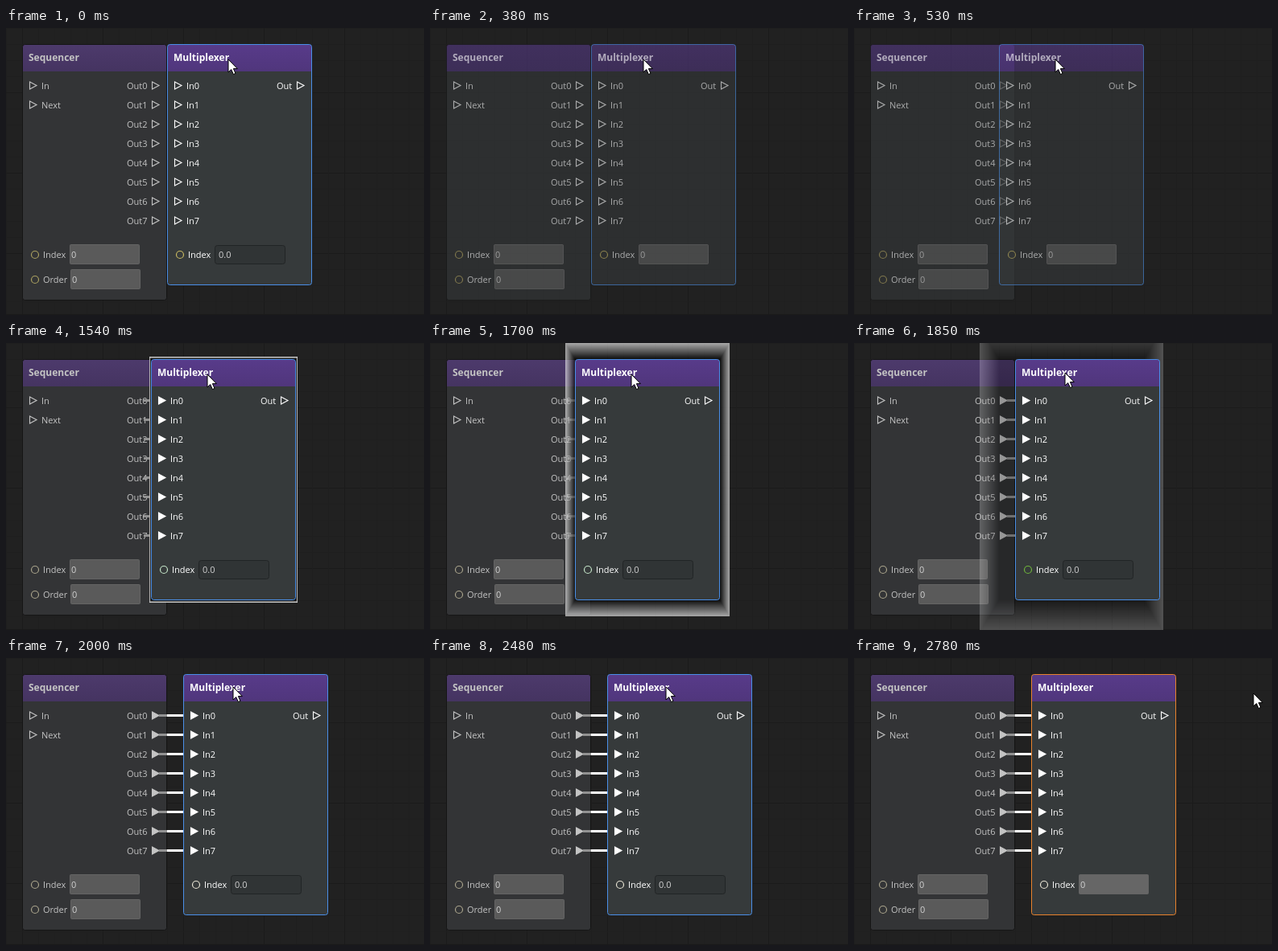
These frames come from a looping animation (519 px wide and 357 px high, 3180 ms). An HTML page with a canvas:

```html
<!DOCTYPE html>
<html lang="en">
<head>
<meta charset="utf-8">
<style>
html, body { margin: 0; width: 100%; height: 100%; overflow: hidden; background: #212121; }
canvas { display: block; }
</style>
</head>
<body>
<canvas id="stage" width="519" height="357"></canvas>
<script>
const LOOP = 3180;
const ctx = document.getElementById('stage').getContext('2d');
const glow = document.createElement('canvas').getContext('2d');
glow.canvas.width = 260;
glow.canvas.height = 420;

// The picture is held between these moments.
const ticks = [0, 70, 150, 380, 450, 530, 1540, 1620, 1700, 1770, 1850, 1930, 2000,
  2080, 2160, 2480, 2550, 2630, 2700, 2780];

const cursorPath = [[0, 276, 39], [150, 270, 39], [300, 270, 39], [380, 265, 39], [450, 256, 39],
  [530, 250, 39], [1700, 250, 39], [1770, 254, 38], [1850, 262, 37], [1930, 273, 36],
  [2000, 282, 36], [2160, 293, 36], [2480, 293, 36], [2550, 316, 37], [2630, 384, 40],
  [2700, 455, 43], [2780, 496, 44]];
const glowScale = [[1540, 1.02], [1700, 1.133], [1850, 1.267], [1940, 1.34]];

function sample(keys, t) {
  const next = keys.findIndex(k => k[0] > t);
  if (next < 0) return keys[keys.length - 1].slice(1);
  if (next === 0) return keys[0].slice(1);
  const a = keys[next - 1], b = keys[next], p = (t - a[0]) / (b[0] - a[0]);
  return a.slice(1).map((v, i) => v + (b[i + 1] - v) * p);
}

function text(str, x, y, color, font = '11px') {
  ctx.font = `${font} "Open Sans", "Noto Sans", sans-serif`;
  ctx.fillStyle = color;
  ctx.fillText(str, x, y);
}

function box(x, y, w, h, r, fill, stroke) {
  ctx.beginPath();
  ctx.roundRect(x + .5, y + .5, w - 1, h - 1, r);
  if (fill) { ctx.fillStyle = fill; ctx.fill(); }
  if (stroke) { ctx.strokeStyle = stroke; ctx.lineWidth = 1; ctx.stroke(); }
}

function triangle(x, y, color, filled) {
  ctx.beginPath();
  ctx.moveTo(x + .5, y - 4.5);
  ctx.lineTo(x + 9, y);
  ctx.lineTo(x + .5, y + 4.5);
  ctx.closePath();
  ctx.strokeStyle = ctx.fillStyle = color;
  ctx.lineWidth = 1.1;
  if (filled) ctx.fill();
  ctx.stroke();
}

function valuePort(x, y, label, ring, color) {
  ctx.beginPath();
  ctx.arc(x + 16, y, 4.5, 0, Math.PI * 2);
  ctx.strokeStyle = ring;
  ctx.lineWidth = 1.2;
  ctx.stroke();
  text(label, x + 26, y + 4, color);
}

function field(x, y, value, active, fill = '#5a5a5a') {
  if (active) box(x, y, 88, 24, 3, '#303435', '#212425');
  else box(x, y - 1, 87, 25, 1, fill, '#646464');
  text(value, x + (active ? 5 : 2), y + 16, '#d2d2d2');
}

function panel(x, height, title, body, top, bottom, border, color) {
  box(x, 20, 180, height, 3, null, null);
  ctx.save();
  ctx.clip();
  ctx.fillStyle = body;
  ctx.fillRect(x, 54, 180, height);
  const shade = ctx.createLinearGradient(0, 20, 0, 54);
  shade.addColorStop(0, top);
  shade.addColorStop(1, bottom);
  ctx.fillStyle = shade;
  ctx.fillRect(x, 20, 180, 34);
  ctx.restore();
  box(x, 20, 180, height, 3, null, border);
  text(title, x + 8, 41, color, 'bold 12px');
}

const rows = draw => { for (let i = 0; i < 8; i++) draw(i, 71.5 + i * 24); };

function drawGrid() {
  ctx.fillStyle = '#212121';
  ctx.fillRect(0, 0, 519, 357);
  for (let v = 0; v < 520; v += 20) {
    ctx.fillStyle = v % 100 === 20 ? '#1b1b1b' : '#1f1f1f';
    ctx.fillRect(v, 0, 1, 357);
    ctx.fillStyle = v % 100 === 80 ? '#1b1b1b' : '#1f1f1f';
    ctx.fillRect(0, v, 519, 1);
  }
  ctx.fillStyle = '#1a1a1a';
  ctx.fillRect(0, 356, 519, 1);
}

function drawSequencer(ghost, linked) {
  const color = ghost ? '#fff' : '#c4c4c4';
  const ring = ghost ? '#b8a860' : linked ? '#aaa48c' : '#aaa060';
  panel(20, 319, 'Sequencer', ghost ? '#363a3b' : '#333436',
    ghost ? '#563a86' : '#4d3a6c', ghost ? '#4f377c' : '#453461', '#151515', color);
  ['In', 'Next'].forEach((label, i) => {
    triangle(29, 71.5 + i * 24, color);
    text(label, 44, 76 + i * 24, color);
  });
  rows((i, y) => {
    text('Out' + i, 150, y + 4.5, color);
    triangle(181, y, color, linked);
  });
  valuePort(20, 282, 'Index', ring, color);
  field(79, 270, '0', false);
  valuePort(20, 313, 'Order', ring, color);
  field(80, 301, '0', false);
}

function drawMultiplexer(x, t, ghost, linked, hovered) {
  let ring = '#c8b860';
  if (linked) ring = x === 180 ? '#c4e4c8' : x === 200 ? '#6fb43c' : '#e8e4d4';
  panel(x, 300, 'Multiplexer', '#363a3b', '#583b8a', '#50367c',
    hovered ? '#4a8fe8' : '#e8822c', '#fff');
  rows((i, y) => {
    triangle(x + 9, y, '#fff', linked);
    text('In' + i, x + 24, y + 4.5, '#fff');
  });
  text('Out', x + 136, 76, '#fff');
  triangle(x + 161, 71.5, '#fff');
  valuePort(x, 282, 'Index', ring, '#fff');
  const active = hovered && !ghost;
  field(x + 59, 270, active ? '0.0' : '0', active, ghost ? '#5a5a5a' : '#666');
}

function drawWires(nodeX) {
  rows((i, y) => {
    ctx.fillStyle = '#929292';
    if (nodeX === 180) ctx.fillRect(171, y - 1.5, 9, 3);
    else ctx.fillRect(190, y - 1.5, 10, 3);
    ctx.fillStyle = '#fff';
    if (nodeX > 200) ctx.fillRect(200, y - 1.5, nodeX - 200, 3);
  });
}

// A dark plate with a bright rim that grows and fades.
function drawGlow(t) {
  if (t < 1540 || t >= 1940) return;
  const [scale] = sample(glowScale, t), steps = 30;
  glow.clearRect(0, 0, 260, 420);
  for (let i = 0; i <= steps; i++) {
    const k = 1 - i / steps, s = 1 + (scale - 1) * k, v = 255 * k;
    glow.fillStyle = `rgb(${v},${v},${v})`;
    glow.fillRect(130 - 90 * s, 210 - 150 * s, 180 * s, 300 * s);
  }
  ctx.globalAlpha = 1 - (t - 1540) / 400;
  ctx.drawImage(glow.canvas, 140, -40);
  ctx.globalAlpha = 1;
}

function drawCursor(x, y) {
  ctx.beginPath();
  [[0, 0], [0, 16], [3.7, 12.6], [6.4, 18.6], [9, 17.5], [6.4, 11.6], [11.3, 11.6]]
    .forEach(([dx, dy]) => ctx.lineTo(x + dx, y + dy));
  ctx.closePath();
  ctx.fillStyle = '#fff';
  ctx.fill();
  ctx.strokeStyle = '#000';
  ctx.lineWidth = 1;
  ctx.stroke();
}

function draw(t) {
  const [cx, cy] = sample(cursorPath, t).map(Math.round);
  const ghost = t >= 380 && t < 1540, linked = t >= 1540;
  const nodeX = t < 380 ? 200 : Math.min(220, 180 + 20 * Math.round((cx - 250) / 20));
  const hovered = cx < nodeX + 180;
  drawGrid();
  ctx.globalAlpha = ghost ? .6 : 1;
  drawSequencer(ghost, linked);
  if (linked) drawWires(nodeX);
  drawGlow(t);
  drawMultiplexer(nodeX, t, ghost, linked, hovered);
  ctx.globalAlpha = 1;
  drawCursor(cx, cy);
}

function frame() {
  const now = performance.now() % LOOP;
  draw(ticks.filter(tick => tick <= now).pop());
  requestAnimationFrame(frame);
}
frame();
</script>
</body>
</html>
```
